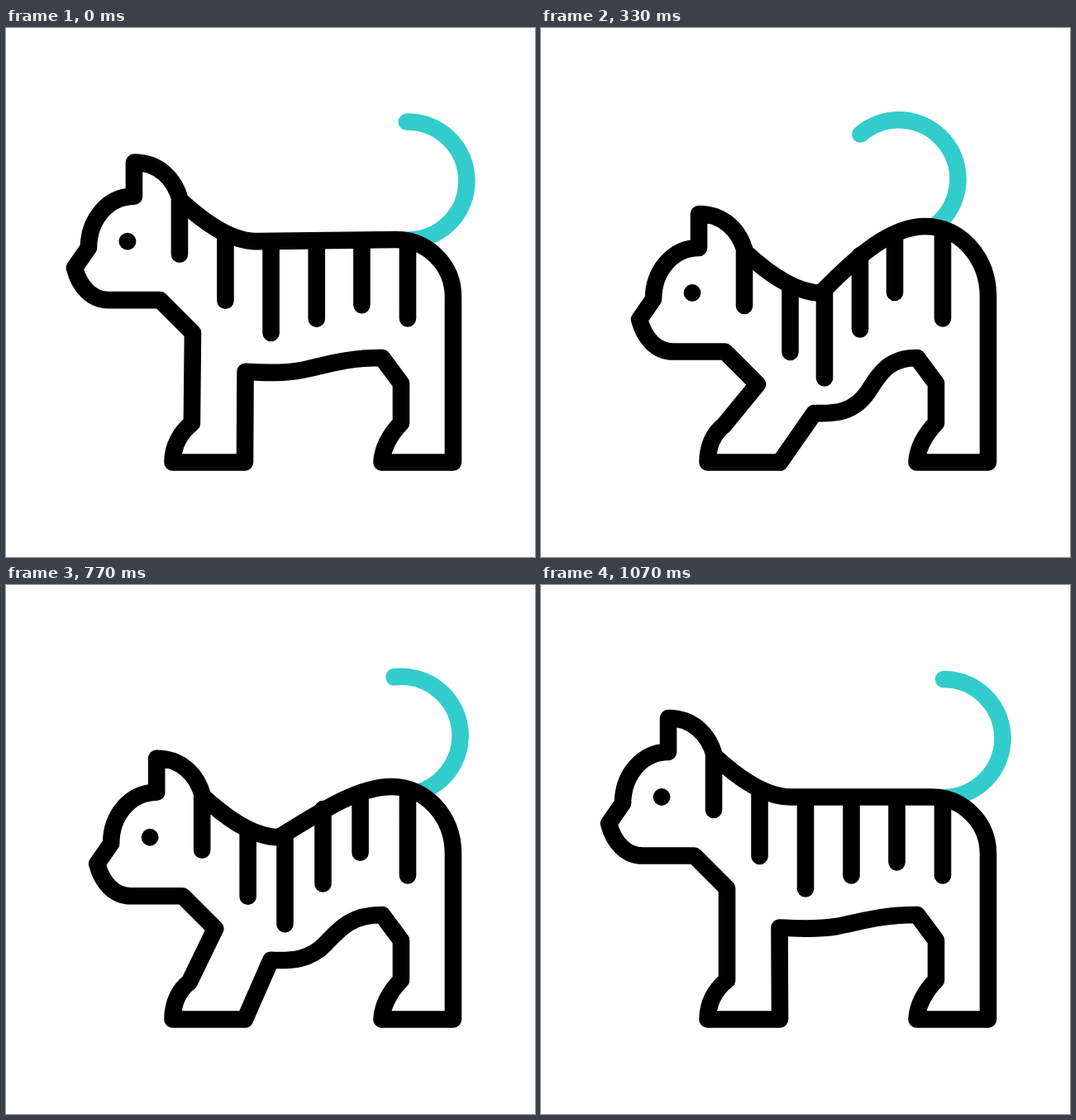
Write an HTML page that moves like this. It is 640 px wide and 640 px high and loops after 1670 ms.

```html
<!DOCTYPE html>
<html lang="en">
<head>
<meta charset="utf-8">
<title>Stretching cat</title>
<style>
  html, body { margin: 0; width: 100%; height: 100%; overflow: hidden; background: #fff; }
  svg { display: block; width: 100%; height: 100%; }
  path { stroke-width: 20.6; stroke-linecap: round; stroke-linejoin: round; fill: none; stroke: #000; }
  #tail { stroke: #3cc; }
  #body { fill: #fff; }
</style>
</head>
<body>
<svg viewBox="0 0 640 640">
  <path id="tail" d="M487 114A71.5 71.5 0 0 1 487 257"/>
  <path id="body"/>
  <path id="stripes"/>
  <circle id="eye" r="10.4"/>
</svg>
<script>
const LOOP = 1670, FRAME = 100 / 3;
const [tail, body, stripes, eye] =
  ["tail", "body", "stripes", "eye"].map(id => document.getElementById(id));

// Eased 0..1 progress between two times
function ease(k, from, to) {
  const u = Math.min(1, Math.max(0, (k - from) / (to - from)));
  return u * u * (3 - 2 * u);
}

function draw(time) {
  const k = Math.floor((time % LOOP + 3.4) / FRAME) + 1;
  const bend = ease(k, 0, 10.4) - ease(k, 20, 32.6);
  const swing = k < 11.7 ? ease(k, 0, 11.5) : 1 - ease(k, 11.9, 28.3);

  // A point at rest, shifted by (dx, dy) at full bend
  const at = (x, y, dx = 0, dy = 0) =>
    `${(x + dx * bend).toFixed(2)} ${(y + dy * bend).toFixed(2)} `;
  // A point that follows the head
  const head = (x, y) => at(x, y, 37, 64);

  body.setAttribute("d",
    "M" + head(302, 256.5) +
    "C" + head(269, 256.5) + head(236, 231) + head(210, 207) +
    "C" + head(203, 180) + head(183, 161) + head(154, 161) +
    "L" + head(154, 202) +
    "C" + head(122, 202) + head(99, 230) + head(99, 264) +
    "L" + head(82, 288.5) +
    "C" + head(88, 312) + head(103, 327.5) + head(123, 327.5) +
    "L" + head(185.5, 327.5) + head(225, 367) + at(225, 478, -4, 3) +
    "C" + at(211, 489, -2, 1) + "201.5 506 201.5 525.5" +
    "H289L" + at(288.5, 414.5, 42, 51.5) +
    "C" + at(312, 416, 45, 51) + at(335, 417, 43, 48) + at(358, 413, 37, 28) +
    "C" + at(385, 408, 25, 10) + at(410, 399, 10) + "455 399" +
    "L478 430V478C464 492 455 510 454.5 525.5H541V325" +
    "C" + at(541, 287, 0, -9) + at(510, 256.5, -3, -16.5) + at(472, 256.5, -7, -16.5) +
    "C" + at(440, 256.5, -15, -16.5) + at(400, 256.5, -14, 15.5) + head(302, 256.5) + "Z");

  const stripe = (x, top, bottom, dx, dTop, dBottom) =>
    "M" + at(x, top, dx, dTop) + "L" + at(x, bottom, dx, dBottom);
  stripes.setAttribute("d",
    stripe(209, 207, 272, 37, 64, 64) +
    stripe(264.5, 247, 328, 37, 64, 64) +
    stripe(320, 258, 367.5, 23, 62, 56) +
    stripe(375.5, 258, 351.5, 10.5, 17, 13) +
    stripe(430.5, 258, 335.5, -2.5, -8, -15.5) +
    stripe(486, 262, 351.5, 0, -12, 0));

  eye.setAttribute("transform", `translate(${head(146, 256.5)})`);
  tail.setAttribute("transform", `rotate(${-40.8 * swing} 456.3 257.3)`);
}

const start = performance.now();
function tick() {
  draw(performance.now() - start);
  requestAnimationFrame(tick);
}
tick();
</script>
</body>
</html>
```
